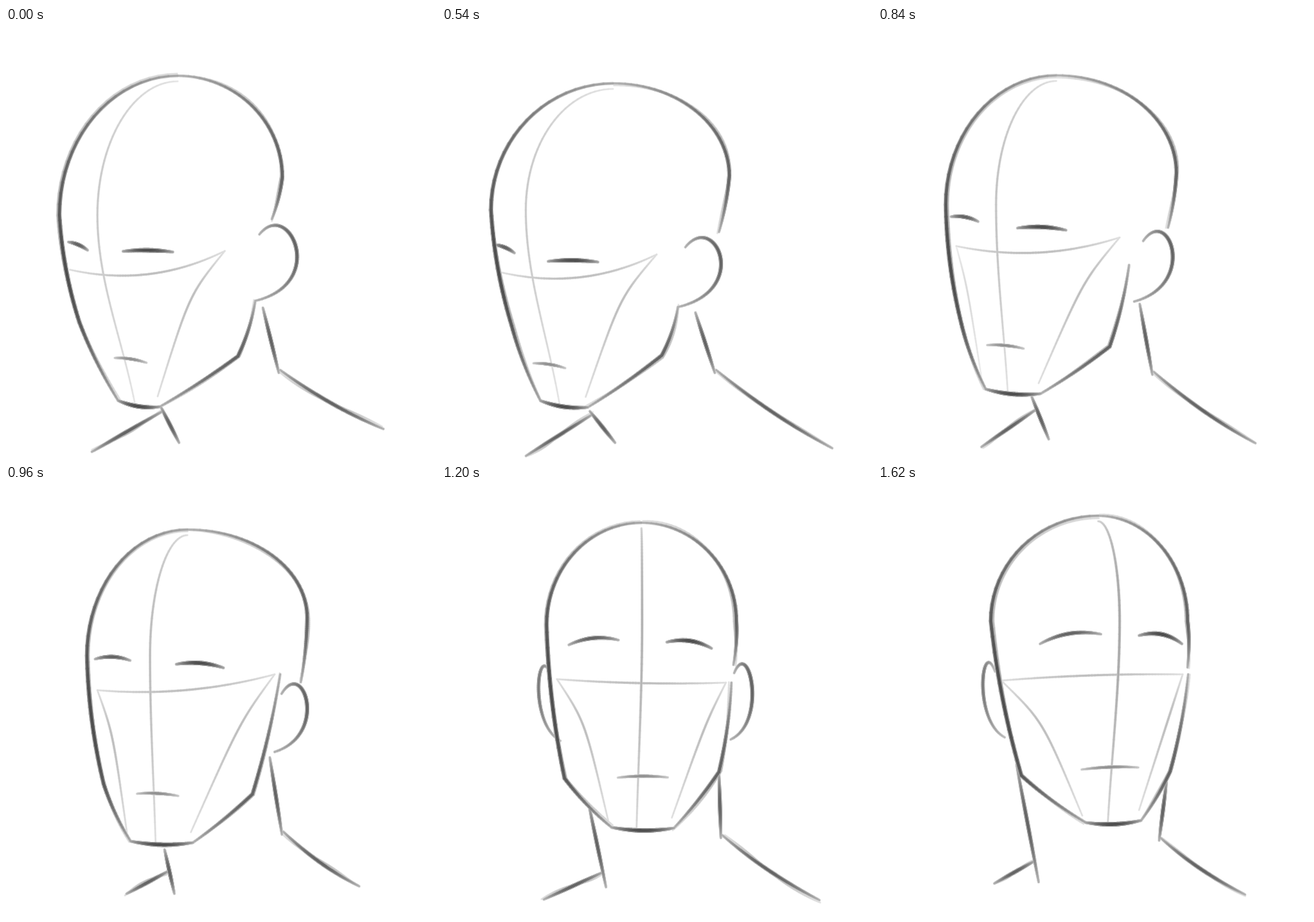
Animation of 621x621 px, one loop 2350 ms. Source, as an HTML page with a canvas:

```html
<!DOCTYPE html>
<html lang="en">
<head>
<meta charset="utf-8">
<title>Turning head sketch</title>
<style>
  html, body { margin: 0; width: 100%; height: 100%; overflow: hidden; background: #fff; }
  canvas { display: block; width: 100%; height: 100%; }
</style>
</head>
<body>
<canvas id="stage" width="621" height="621"></canvas>
<script>
const ctx = document.getElementById("stage").getContext("2d");
const LOOP = 2350, STEP = 60;

// The poses are reached at "arrive" and left again after "leave".
const arrive = [0, 180, 720, 960, 1200, 1440, 1620];
const leave = [0, 480, 720, 960, 1200, 1440, LOOP];

// Head turn (0 = looking left, 1 = right) and centre line per pose.
const turns = [0, 0, 0, 0.38, 0.73, 0.85, 1];
const centres = [132, 117, 133, 208, 289, 320, 349];

// Key points of the head: x, y for each pose.
const landmarks = {
  crown:     [248,69, 245,82, 253,74, 262,63, 288,53, 302,52, 318,43],
  temple:    [77,270, 68,262, 79,265, 117,245, 151,200, 160,190, 163,195],
  back:      [399,215, 411,208, 427,228, 435,190, 425,195, 437,185, 447,195],
  cheek:     [106,425, 101,432, 100,425, 141,430, 177,422, 196,426, 207,418],
  chinL:     [162,538, 146,541, 131,530, 180,513, 245,493, 290,493, 300,486],
  chinR:     [222,547, 214,550, 200,541, 270,515, 335,494, 362,490, 380,483],
  jaw:       [335,474, 319,472, 313,475, 356,445, 400,413, 409,428, 422,412],
  earFront:  [366,298, 346,317, 368,315, 398,300, 422,270, 438,272, 447,270],
  lobe:      [360,394, 337,402, 352,406, 388,384, 417,366, 431,363, 445,350],
  planeTop:  [316,322, 310,325, 310,333, 388,272, 410,284, 425,275, 440,272],
  browL:     [104,315, 89,325, 96,301, 154,251, 219,226, 250,222, 278,221],
  browR:     [205,323, 188,343, 193,321, 280,260, 357,230, 383,222, 408,222],
  mouth:     [180,480, 157,492, 149,475, 219,446, 290,421, 316,413, 335,408],
  neckR:     [371,404, 363,413, 375,405, 381,392, 400,415, 405,435, 417,425],
  shoulderR: [545,579, 558,602, 580,621, 510,578, 545,598, 535,591, 530,590],
  neckL:     [224,548, 213,558, 215,540, 229,525, 212,460, 206,440, 200,402],
  shoulderL: [124,612, 120,617, 125,621, 174,589, 147,597, 155,594, 168,574]
};

const mix = (a, b, t) => a + (b - a) * t;
const clamp = value => Math.max(0, Math.min(1, value));
const between = (a, b, t) => [mix(a[0], b[0], t), mix(a[1], b[1], t)];
const shift = ([x, y], dx, dy) => [x + dx, y + dy];

// Paths are functions from t (0 to 1) to a point.
const curve = (a, p, q, b) => t => {
  const pq = between(p, q, t);
  return between(
    between(between(a, p, t), pq, t),
    between(pq, between(q, b, t), t), t);
};

function bow(a, b, sag = 0) {
  const dx = b[0] - a[0], dy = b[1] - a[1], push = 4 * sag / Math.hypot(dx, dy);
  return t => shift(between(a, b, t), -dy * push * t * (1 - t), dx * push * t * (1 - t));
}

// Quarter ellipse, level at a and upright at b.
const quarter = (a, b) => t => [
  mix(a[0], b[0], Math.sin(t * Math.PI / 2)),
  mix(b[1], a[1], Math.cos(t * Math.PI / 2))
];

const join = (...paths) => t => {
  const i = Math.min(paths.length - 1, Math.floor(t * paths.length));
  return paths[i](t * paths.length - i);
};

const level = ([x, y], width, rise, sag) =>
  bow([x - width / 2, y - rise / 2], [x + width / 2, y + rise / 2], sag);

const ear = (front, lobe, width) =>
  curve(front, shift(front, 34 * width, -53), shift(lobe, 85 * width, -25), lobe);

let seed;
function random() {
  const value = Math.sin(++seed) * 43758.5453;
  return value - Math.floor(value);
}

// Soft halo and darker core; "darken" keeps overlapping caps from adding up.
function pencil(path, ink) {
  const count = 60;
  for (const [width, widthPerInk, shade] of [[2, 0.6, 12], [1, 0.4, 22]]) {
    for (let i = 0; i < count; i++) {
      const pressure = ink * (0.5 + 0.5 * Math.sin(Math.PI * (i + 0.5) / count));
      const grey = Math.round(255 - shade * pressure);
      ctx.strokeStyle = `rgb(${grey},${grey},${grey})`;
      ctx.lineWidth = width + widthPerInk * pressure;
      ctx.beginPath();
      ctx.moveTo(...path(i / count));
      ctx.lineTo(...path((i + 1) / count));
      ctx.stroke();
    }
  }
}

// A firm stroke with a lighter one wandering beside it.
function sketch(path, ink) {
  const phase = random() * 2 * Math.PI;
  const drift = 2 + 2 * random();
  pencil(t => shift(path(t), drift * Math.sin(5 * t + phase), drift * Math.cos(5 * t + phase)), ink * 0.4);
  pencil(path, ink);
}

function poseAt(time) {
  const from = arrive.findLastIndex(start => start <= time);
  const to = Math.min(from + 1, arrive.length - 1);
  const progress = from === to ? 0 : clamp((time - leave[from]) / (arrive[to] - leave[from]));
  const pose = {
    turn: mix(turns[from], turns[to], progress),
    centre: mix(centres[from], centres[to], progress)
  };
  for (const [name, track] of Object.entries(landmarks)) {
    const point = i => track.slice(2 * i, 2 * i + 2);
    pose[name] = between(point(from), point(to), progress);
  }
  return pose;
}

function drawOutline(p) {
  const { turn } = p;
  const nape = [p.back[0] - 15 * (1 - turn), p.earFront[1] - mix(22, 8, turn)];
  const jawTop = between(p.lobe, shift(p.planeTop, 8, 0), clamp(turn * 3));
  sketch(join(quarter(p.crown, p.temple), bow(p.temple, p.cheek, 5), bow(p.cheek, p.chinL, 3)), 8);
  sketch(join(quarter(p.crown, p.back), bow(p.back, nape, -2)), 7);
  pencil(bow(p.chinL, p.chinR, 4), 8);
  sketch(join(bow(p.chinR, p.jaw, 2), bow(p.jaw, jawTop, 3)), 7);

  const earL = shift(p.temple, 6, 73);
  pencil(ear(p.earFront, p.lobe, 1.25 - 0.85 * turn), 7 * clamp((1 - turn) * 7));
  pencil(ear(earL, shift(earL, 14, 95), -0.55), 6 * clamp((turn - 0.5) * 5));
}

function drawGuides(p) {
  const { turn } = p;
  const middle = [p.centre, p.temple[1]];
  const chin = between(p.chinL, p.chinR, 0.4);
  pencil(join(quarter(shift(p.crown, 0, 8), middle),
    curve(middle, shift(middle, 0, 95), between(middle, chin, 0.65), chin)), 2.5 + 1.5 * turn);

  const eyeL = [p.temple[0] + 15, p.browL[1] + mix(34, 60, turn)];
  pencil(bow(eyeL, p.planeTop, mix(20, -3, turn)), 3);

  const planeEnd = shift(p.chinR, -3, -15);
  const planeBend = shift(between(p.planeTop, planeEnd, 0.3), mix(-22, 0, turn), 0);
  pencil(curve(p.planeTop, planeBend, planeBend, planeEnd), 3);
  const leftEnd = shift(p.chinL, -5, -10);
  const leftBend = shift(between(eyeL, leftEnd, 0.3), 25 * turn, 0);
  pencil(curve(eyeL, leftBend, leftBend, leftEnd), 3 * clamp(turn * 3));
}

function drawFeatures(p) {
  const { turn } = p, arch = -2 - 6 * turn;
  pencil(level(p.browL, 28 + 60 * turn, mix(12, -14, turn), arch), 7);
  pencil(level(p.browR, 72 - 10 * turn, 1 + 11 * turn, arch), 8);
  pencil(level(p.mouth, 46 + 36 * turn, mix(7, -3, turn), -2), 5);
}

function drawBody(p) {
  const { turn } = p;
  const baseL = [mix(250, 232, turn), mix(599, 572, turn)];
  const baseR = [394 + 12 * turn, 498 + 14 * turn];
  const collar = between(p.neckL, baseL, Math.min(0.82, 0.1 + turn));
  pencil(bow(p.neckR, baseR), 7);
  sketch(bow(shift(baseR, 2, -4), p.shoulderR, 5), 7);
  pencil(bow(p.neckL, baseL), 7);
  sketch(bow(collar, p.shoulderL), 7);
}

function draw(time) {
  const pose = poseAt(time);
  seed = time;
  ctx.globalCompositeOperation = "source-over";
  ctx.fillStyle = "#fff";
  ctx.fillRect(0, 0, 621, 621);
  ctx.globalCompositeOperation = "darken";
  ctx.lineCap = "round";
  drawOutline(pose);
  drawGuides(pose);
  drawFeatures(pose);
  drawBody(pose);
}

let shown = -1;
function tick(now) {
  // Poses hold still between steps, and the long hold keeps one drawing.
  const step = Math.min(Math.floor(now % LOOP / STEP) * STEP, arrive.at(-1));
  const time = step > arrive[1] && step <= leave[1] ? arrive[1] : step;
  if (time !== shown) draw(shown = time);
  requestAnimationFrame(tick);
}
draw(0);
requestAnimationFrame(tick);
</script>
</body>
</html>
```
